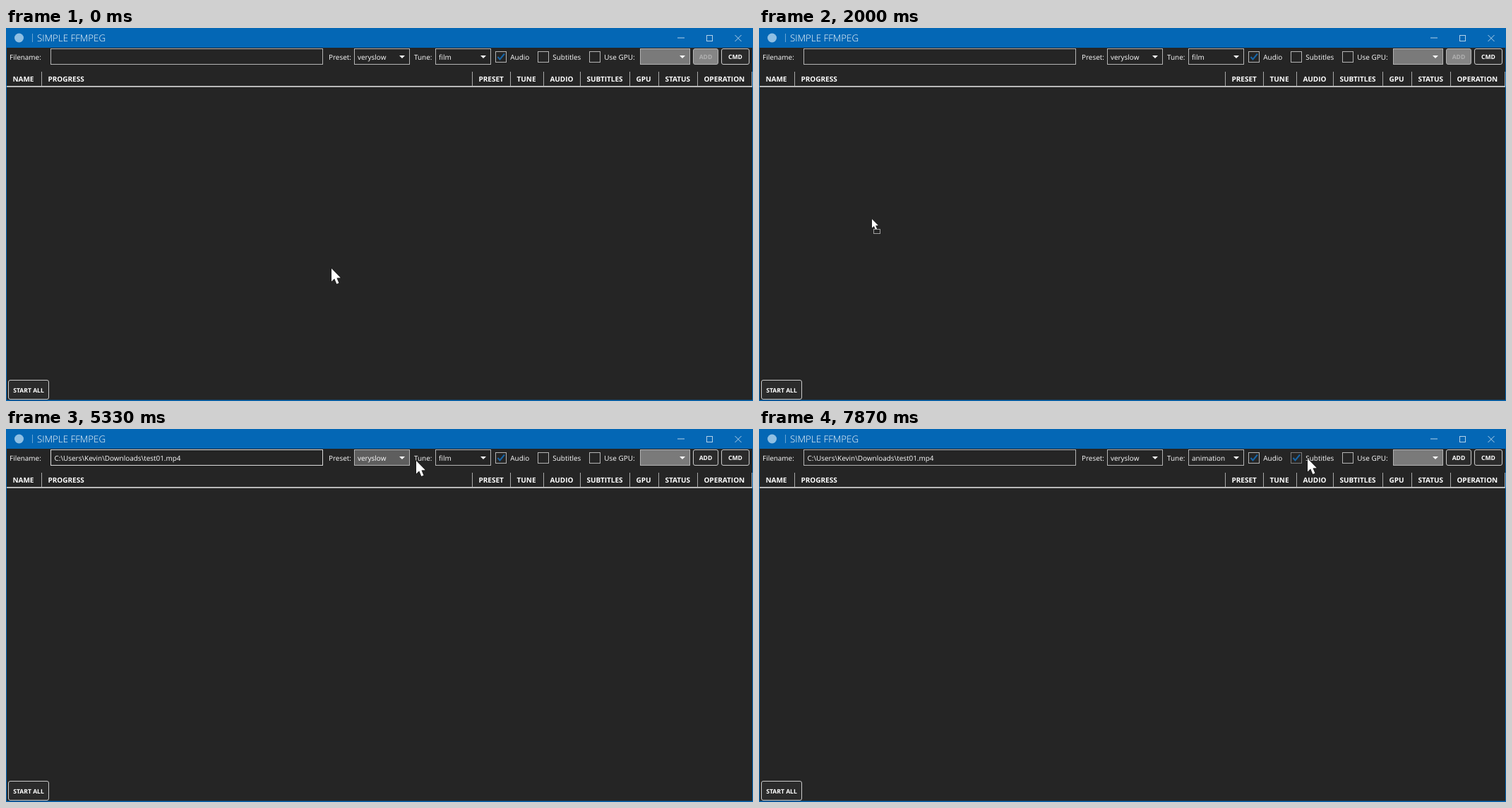
Animation of 1058 by 529 pixels, one loop 8000 ms. Source, as an HTML page with a canvas:

```html
<!DOCTYPE html>
<html>
<head>
<meta charset="utf-8">
<style>
html, body { margin: 0; width: 100%; height: 100%; overflow: hidden; background: #252525; }
canvas { display: block; }
</style>
</head>
<body>
<canvas id="stage" width="1058" height="529"></canvas>
<script>
const c = document.getElementById('stage').getContext('2d');
c.textRendering = 'geometricPrecision';

const BLUE = '#0467b5', DARK = '#252525', LINE = '#b4b4b4', FOCUS = '#dcdcdc', HOVER = '#5e5e5e';
const FAMILY = '"Open Sans", "Noto Sans", sans-serif';
const BODY = '9.95px ' + FAMILY, HEAD = '700 10px ' + FAMILY;
const BUTTON = '700 8.6px ' + FAMILY, TITLE = '300 13.3px ' + FAMILY;
const PATH = 'C:\\Users\\Kevin\\Downloads\\test01.mp4';
const COLUMNS = { NAME: 0, PROGRESS: 50, PRESET: 660, TUNE: 714, AUDIO: 761,
  SUBTITLES: 813, GPU: 883, STATUS: 924, OPERATION: 979 };
const TUNES = ['film', 'animation', 'grain', 'stillimage', 'fastdecode', 'zerolatency', 'psnr', 'ssim'];

// Time runs in ticks of 1/15 s
const LEAVE = 13, UNFOCUS = 26, DRAG = 30, DROP = 38, SELECT = 55, CLICK = 70,
  OPEN = 90, CLOSE = 103, CHECK = 117, TICKS = 120;

// Pointer moves: first tick, last tick, end x, end y
const MOVES = [
  [9, LEAVE, 40, 529], [DRAG - 1, DRAG, 160, 271], [DRAG, 32, 213, 236], [33, 37, 232, 197],
  [44, 46, 236, 186], [48, 53, 262, 49], [64, 65, 14, 40], [66, 68, 235, 40],
  [CLICK, 80, 581, 45], [80, 81, 633, 43], [93, 100, 640, 74], [108, 110, 777, 42]
];

const within = (n, from, to) => n >= from && n < to;
const clamp = v => Math.max(0, Math.min(1, v));
const smooth = v => v * v * (3 - 2 * v);

function pointer(n) {
  let x = 461, y = 341;
  for (const [from, to, endX, endY] of MOVES) {
    const f = smooth(clamp((n - from) / (to - from)));
    x += (endX - x) * f;
    y += (endY - y) * f;
  }
  return { x: Math.round(x), y: Math.round(y) };
}

function over(n, x, w, y = 29, h = 23) {
  const p = pointer(n);
  return within(p.x, x, x + w) && within(p.y, y, y + h);
}

function fill(x, y, w, h, color) {
  c.fillStyle = color;
  c.fillRect(x, y, w, h);
}

function box(x, y, w, h, line = LINE, back) {
  if (back) fill(x, y, w, h, back);
  c.strokeStyle = line;
  c.lineWidth = 1;
  c.strokeRect(x + .5, y + .5, w - 1, h - 1);
}

function text(str, x, y = 44.5, font = BODY, color = '#fff') {
  c.font = font;
  c.fillStyle = color;
  c.fillText(str, x, y);
}

function trace(points) {
  c.beginPath();
  points.forEach(p => c.lineTo(...p));
}

function stroke(points, color, width = 1) {
  trace(points);
  c.strokeStyle = color;
  c.lineWidth = width;
  c.stroke();
}

function button(x, y, w, h, label, enabled = true) {
  c.beginPath();
  c.roundRect(x + .5, y + .5, w - 1, h - 1, 2.5);
  c.fillStyle = enabled ? '#2b2b2b' : '#858585';
  c.fill();
  c.strokeStyle = enabled ? '#cccccc' : '#b5b5b5';
  c.lineWidth = 1;
  c.stroke();
  c.textAlign = 'center';
  text(label, x + w / 2, y + h / 2 + 3.5, BUTTON, enabled ? '#fff' : '#b0b0b0');
  c.textAlign = 'left';
}

function combo(x, w, label, line, back) {
  box(x, 29, w, 23, line, back);
  text(label, x + 5);
  const tip = x + w - 11;
  trace([[tip - 4, 39], [tip + 4, 39], [tip, 43]]);
  c.fillStyle = '#fff';
  c.fill();
}

function checkbox(x, label, checked, line) {
  box(x, 33, 16, 16, line);
  if (checked) stroke([[x + 3.5, 41], [x + 6.5, 44.5], [x + 13, 36.5]], '#1766a9', 2);
  text(label, x + 21.3);
}

function arrow(x, y, size) {
  c.save();
  c.translate(x, y);
  c.scale(size, size);
  trace([[0, 0], [0, 17.5], [4, 13.8], [7, 21], [10, 19.8], [7.1, 12.8], [12.3, 12.5]]);
  c.closePath();
  c.strokeStyle = '#111';
  c.lineWidth = 1;
  c.stroke();
  c.fillStyle = '#fff';
  c.fill();
  c.restore();
}

function frameBar(accent) {
  fill(0, 0, 1058, 28, accent);
  fill(0, 28, 1, 501, accent);
  fill(1057, 28, 1, 501, accent);
  fill(0, 527.5, 1058, 1.5, accent);
  c.fillStyle = '#8fbfe3';
  c.beginPath();
  c.arc(18.5, 14, 6.5, 0, 7);
  c.fill();
  fill(37, 8, 1, 12, '#69a5d4');
  text('SIMPLE FFMPEG', 44, 19, TITLE);
  const glyph = '#b4d2ea';
  fill(951, 13.5, 10, 1, glyph);
  box(992, 10, 9, 9, glyph);
  stroke([[1032.5, 10], [1041.5, 19]], glyph);
  stroke([[1041.5, 10], [1032.5, 19]], glyph);
}

function fileBox(n) {
  const focused = within(n, SELECT, OPEN);
  box(63, 29, 386, 23, focused || over(n - 1, 63, 386) ? FOCUS : LINE);
  if (n < DROP) return;
  text(PATH, 68.5);
  const w = c.measureText(PATH).width;
  if (within(n, SELECT, CLICK)) {
    const part = clamp((n - SELECT) / 7);
    c.globalAlpha = .4;
    fill(68.5 + w * (1 - part), 34, w * part, 14, BLUE);
    c.globalAlpha = 1;
  }
  const blinkOn = (n - CLICK) % 15 < 8;
  if (within(n, CLICK, OPEN) && blinkOn) fill(234, 34, 1, 14, '#fff');
}

function dropdown(n) {
  const row = 19.45, chosen = pointer(n).y > 73 ? 1 : 0;
  c.globalAlpha = clamp((n - OPEN + 1) / 3);
  box(608, 51, 79, 160, '#a0a0a0', DARK);
  fill(610, 54 + chosen * row, 76, 19, BLUE);
  TUNES.forEach((name, i) => text(name, 611, 67.2 + i * row));
  c.globalAlpha = 1;
}

function header(n) {
  if (n >= CLOSE && over(n - 1, 51, 609, 62, 20)) fill(51, 62, 609, 20, '#454545');
  for (const [name, x] of Object.entries(COLUMNS)) {
    text(name, x + 9.4, 76.3, HEAD);
    if (x) fill(x, 62, 1, 20, '#a8a8a8');
  }
  fill(1056, 62, 1, 20, '#a8a8a8');
  fill(1, 82, 1056, 2, '#b9b9b9');
}

function cursor(n) {
  const { x, y } = pointer(n), dragging = within(n, DRAG, DROP);
  const typing = n >= SELECT && over(n, 63, 386);
  if (typing || within(n, LEAVE, DRAG)) return;
  arrow(x, y, dragging ? .72 : 1.05);
  if (dragging) box(x + 2, y + 14, 10, 7, '#a0a0a0', DARK);
}

function draw(n) {
  const open = within(n, OPEN, CLOSE);
  fill(0, 0, 1058, 529, DARK);
  frameBar(within(n, UNFOCUS, DRAG) ? '#808080' : BLUE);

  text('Filename:', 5);
  fileBox(n);
  text('Preset:', 457);
  combo(493, 79, 'veryslow', LINE, over(n - 1, 493, 79) && HOVER);
  text('Tune:', 578);
  combo(608, 79, TUNES[n < CLOSE ? 0 : 1], within(n, OPEN, CHECK) ? FOCUS : LINE,
    (open || over(n - 1, 608, 79)) && HOVER);
  checkbox(693, 'Audio', true);
  checkbox(753, 'Subtitles', n >= CHECK, over(n - 1, 753, 62) ? '#7c7c7c' : LINE);
  checkbox(826, 'Use GPU:', false);
  combo(898, 71, '', LINE, '#7a7a7a');
  button(973, 29, 36, 23, 'ADD', n >= DROP);
  button(1013, 29, 40, 23, 'CMD');

  header(n);
  button(3, 499, 58, 28, 'START ALL');
  if (open) dropdown(n);
  cursor(n);
}

function frame(now) {
  draw(Math.floor((now % 8000 + 4) * .015) % TICKS);
  requestAnimationFrame(frame);
}
draw(0);
requestAnimationFrame(frame);
</script>
</body>
</html>
```
